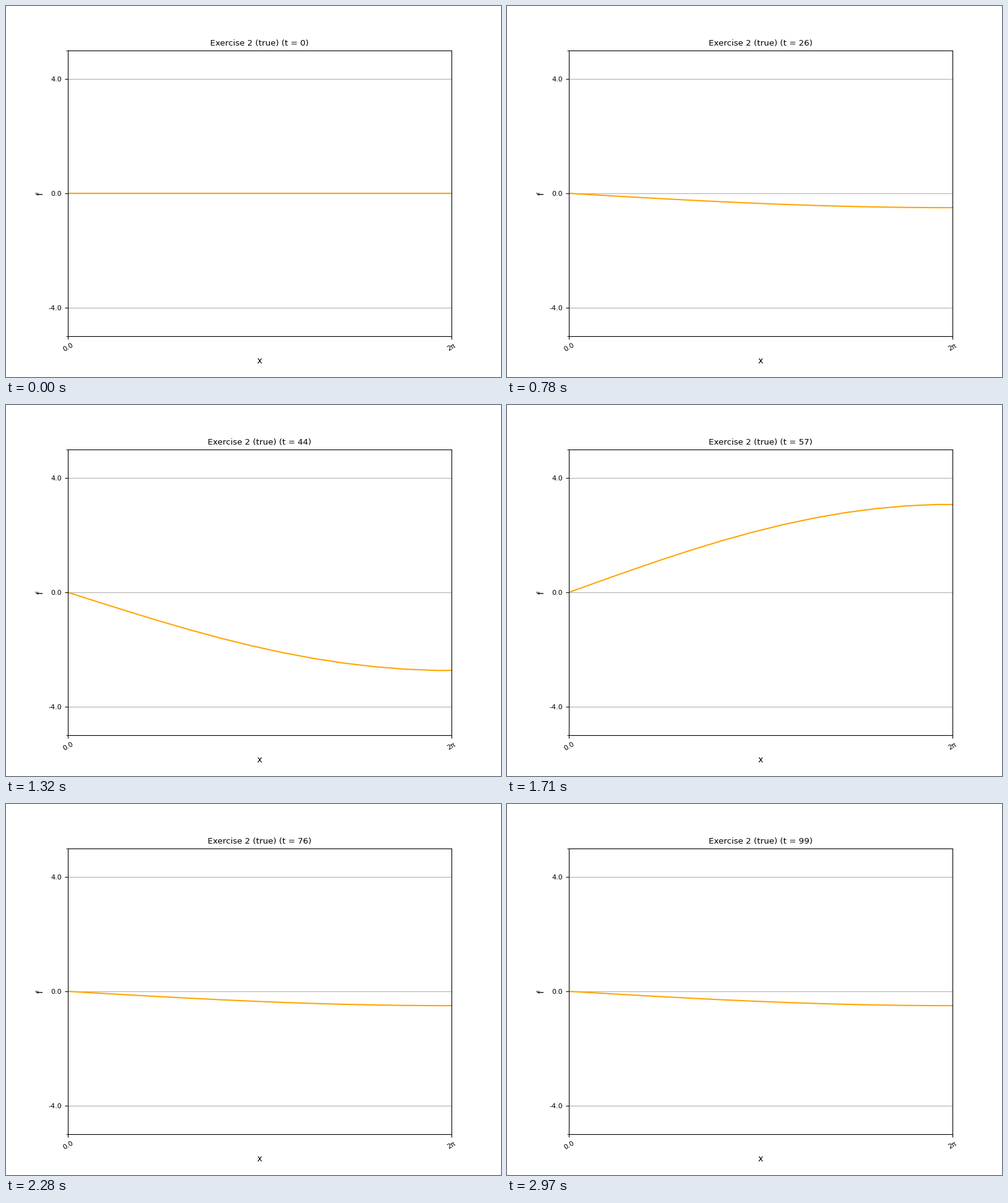
A matplotlib script that plays this animation: 800 by 600 pixels, repeating every 3000 ms.

```python
import matplotlib.pyplot as plt
import numpy as np
from matplotlib.animation import FuncAnimation

FRAMES = 100
INTERVAL = 30  # ms
PERIOD = 50    # frames per oscillation
AMPLITUDE = 4

plt.rcParams.update({
    "font.family": "DejaVu Sans",
    "font.size": 8,
    "axes.labelsize": 10,
    "axes.titlesize": 9.6,
})

fig, ax = plt.subplots(figsize=(8, 6), dpi=100)

# The standing wave spans 0..4π; only its first half is in view.
x = np.linspace(0, 4 * np.pi, 26)
shape = AMPLITUDE * np.sin(x / 4)
line, = ax.plot(x, 0 * x, color="orange", lw=1.5)

ax.set_xlim(0, 2 * np.pi)
ax.set_ylim(-5, 5)
ax.set_xticks([0, 2 * np.pi], ["0.0", "2π"], rotation=30)
ax.set_yticks([-4, 0, 4], ["-4.0", "0.0", "4.0"])
ax.set_yticks([-5, 5], minor=True)
ax.grid(axis="y")
ax.set_xlabel("x")
ax.set_ylabel("f")


def update(t):
    line.set_ydata(shape * np.sin(2 * np.pi * t / PERIOD))
    ax.set_title(f"Exercise 2 (true) (t = {t})")
    return line, ax.title


anim = FuncAnimation(fig, update, frames=FRAMES, interval=INTERVAL,
                     repeat=True, blit=False)
plt.show()
```
